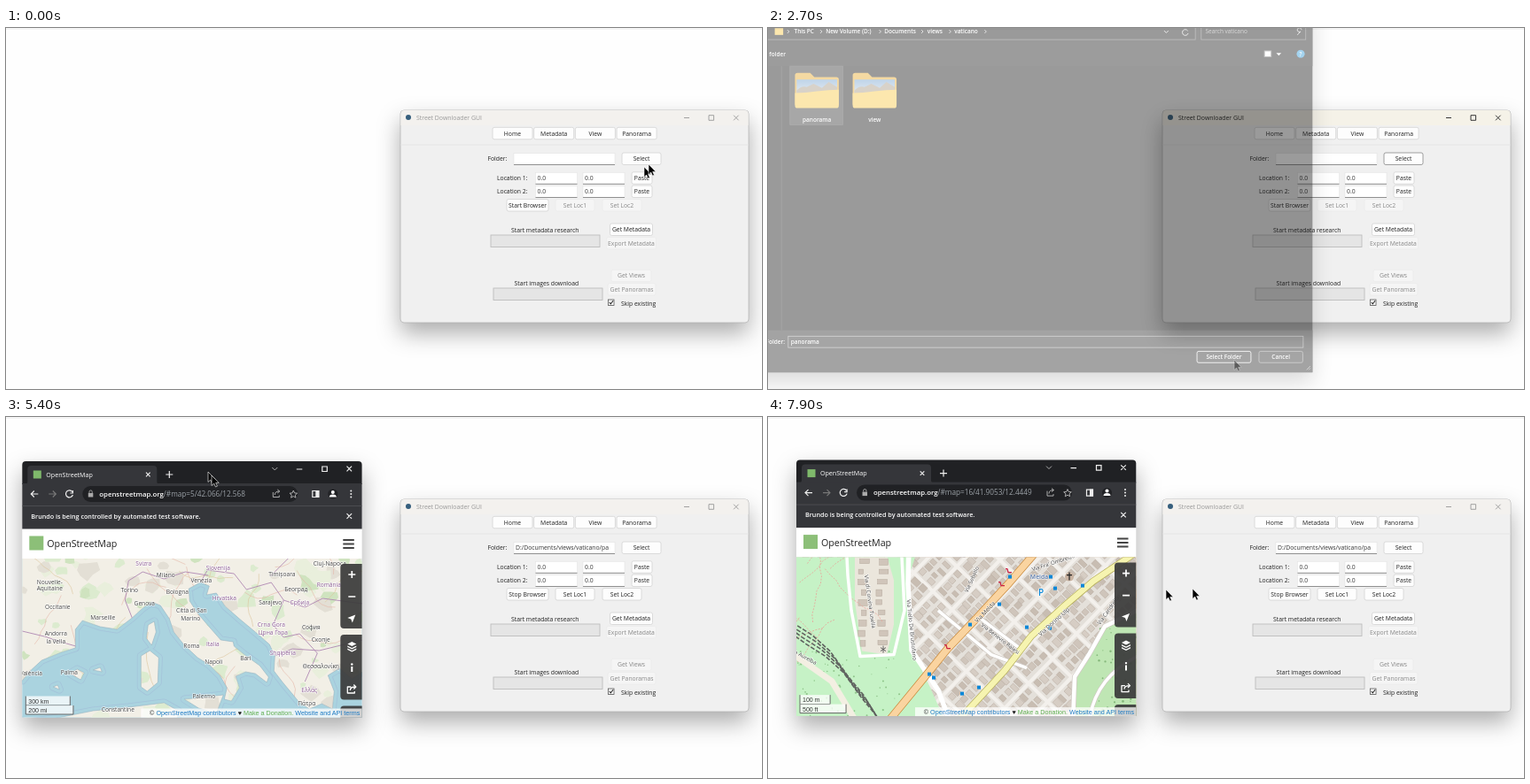
These frames come from a looping animation (853 by 408 pixels, 8 s). An HTML page:

```html
<!DOCTYPE html>
<html lang="en">
<head>
<meta charset="utf-8">
<title>Street Downloader</title>
<style>
html, body { margin: 0; width: 853px; height: 408px; overflow: hidden; background: #fefefe }
svg { display: block; font-family: "Open Sans", "Noto Sans", sans-serif }
text { white-space: pre }
.shadow { filter: drop-shadow(0 12px 13px rgba(0, 0, 0, .32)) }
.btn rect { fill: #fdfdfd; stroke: #d3d3d3; stroke-width: .8 }
.btn text { fill: #222; text-anchor: middle }
.btn.off rect { fill: #f5f5f5; stroke: #ebebeb }
.btn.off text { fill: #888 }
.btn.hot rect { fill: #c9e1f3; stroke: #2d78b4; stroke-width: 1.2 }
.btn.focus rect { stroke: #888 }
.halo text { paint-order: stroke; stroke: #fff; stroke-opacity: .7; stroke-width: 1.6; stroke-linejoin: round; text-anchor: middle }
.icon { fill: none; stroke: #eee; stroke-width: 1.2 }
</style>
</head>
<body>
<script>
const text = (x, y, s, size = 6.8, a = '') => `<text x="${x}" y="${y}" font-size="${size}" ${a}>${s}</text>`;
const rect = (x, y, w, h, fill, a = '') => `<rect x="${x}" y="${y}" width="${w}" height="${h}" fill="${fill}" ${a}/>`;
const path = (d, fill, a = '') => `<path d="${d}" fill="${fill}" ${a}/>`;
const line = (d, color, w = 1, a = '') => path(d, 'none', `stroke="${color}" stroke-width="${w}" stroke-linejoin="round" ${a}`);
const dot = (x, y, r, fill) => `<circle cx="${x}" cy="${y}" r="${r}" fill="${fill}"/>`;
const times = (n, f) => Array.from({ length: n }, (_, i) => f(i)).join('');

let seed = 7;
const rnd = (a = 0, b = 1) => {
  seed = (seed * 16807) % 2147483647;
  return a + (b - a) * seed / 2147483647;
};
const pick = list => list[Math.floor(rnd(0, list.length))];
const blob = (x, y, size, fill) => {
  let pts = [];
  for (let i = 0; i < 8; i++) {
    const r = size * rnd(.5, 1.1), a = i * Math.PI / 4;
    pts.push((x + r * Math.cos(a)).toFixed(1) + ' ' + (y + r * .8 * Math.sin(a)).toFixed(1));
  }
  return path('M' + pts.join('L') + 'Z', fill);
};
const wander = (x, y, a, n, step, bend) => {
  let d = `M${x.toFixed(1)} ${y.toFixed(1)}`;
  for (let i = 0; i < n; i++) {
    a += rnd(-bend, bend);
    x += step * Math.cos(a);
    y += step * Math.sin(a);
    d += `L${x.toFixed(1)} ${y.toFixed(1)}`;
  }
  return d;
};

// Downloader window
const btn = (x, y, w, s, cls = '', id = '') =>
  `<g class="btn ${cls}" id="${id}">${rect(x, y, w, 13.5, '', 'rx="2"')}${text(x + w / 2, y + 9.2, s)}</g>`;
const field = (x, y, w, s, id = '') =>
  rect(x, y, w, 13, '#fff', 'stroke="#e4e4e4" stroke-width=".6"') + line(`M${x} ${y + 13}h${w}`, '#858585', .9) +
  text(x + 2, y + 8.9, s, 6.8, `id="${id}" fill="#333"`);
const bar = (x, y) => rect(x, y, 123, 13.5, '#e5e5e5', 'stroke="#bdbdbd" stroke-width=".9"');
const gui = `
${rect(445, 93, 393, 240, '#f0f0f0', 'rx="4" class="shadow"')}
${rect(445, 93, 393, 240, '#f0f0f0', 'rx="4" stroke="#b5b5b5" stroke-width=".8"')}
${path('M445.5 110V97q0-4 4-4h384q4 0 4 4v13z', '#f3f1ee', 'id="titlebar"')}
${dot(454, 101, 3, '#365f7d')}
<g id="title">${text(463, 104, 'Street Downloader GUI', 6.9, 'fill="currentColor"')}
${line('M765 101.5h6M793 98.7h5.6v5.6h-5.6zM821 98.7l5.6 5.6m0-5.6l-5.6 5.6', 'currentColor', .9)}</g>
${['Home', 'Metadata', 'View', 'Panorama'].map((s, i) => btn(549 + i * 46.7, 112.3, 45, s)).join('')}
${line('M445 132h393', '#e2e2e2', .8)}
<g fill="#222">${text(543.5, 150.3, 'Folder:')}${field(573, 141.5, 114, '', 'folder')}${btn(695, 141, 44, 'Select', '', 'select')}
${[0, 1].map(i => text(554, 172.1 + i * 15.2, `Location ${i + 1}:`) + field(597.5, 163.3 + i * 15.2, 47, '0.0') +
    field(651, 163.3 + i * 15.2, 47, '0.0') + btn(706, 162.8 + i * 15.2, 23, 'Paste')).join('')}
${btn(565, 193.5, 47, 'Start Browser', '', 'start')}${btn(620, 193.5, 44, 'Set Loc1', 'off', 'loc1')}${btn(673, 193.5, 44, 'Set Loc2', 'off', 'loc2')}
${text(570, 231, 'Start metadata research')}${bar(547, 234)}
${btn(681.5, 221, 48, 'Get Metadata')}${btn(677.5, 236.4, 56, 'Export Metadata', 'off')}
${text(573.5, 291, 'Start images download')}${bar(550, 294)}
${btn(683, 273.2, 45, 'Get Views', 'off')}${btn(679, 288.6, 54, 'Get Panoramas', 'off')}
${rect(679.5, 307, 6.5, 6.5, '#fff', 'stroke="#555" stroke-width=".8"')}${line('M680.8 310l1.6 1.8 2.6-3.6', '#222', 1.1)}
${text(694, 313.5, 'Skip existing')}</g>`;

// Folder picker
const folder = (x, name) => `
${path(`M${x} 48q0-3 3-3h15l5 5h26q3 0 3 3v30H${x}z`, '#e9a92a')}
${rect(x + 2, 53, 48, 22, 'url(#photo)')}
${path(`M${x + 2} 66q6-6 12-4l8-4 10 5 8-7 10 6v8h-48z`, '#a79a86')}
${path(`M${x} 69q12 0 26-2 14-2 26-2v19q0 3-3 3h-46q-3 0-3-3z`, '#fbc947')}
${text(x + 26, 103.5, name, 6.8, 'fill="#fff" font-weight="600" text-anchor="middle"')}`;
const white = 'fill="#fff" font-weight="600"';
const crumbs = [[19, 'This PC'], [56.5, 'New Volume (D:)'], [126, 'Documents'], [177, 'views'], [209, 'vaticano']];
const picker = `
${rect(-60, -40, 694, 441, '#191919', 'class="shadow"')}
${rect(-60, -40, 694, 47, '#202020')}${rect(-60, 7, 694, 30, '#1c1c1c')}
${rect(-20, -14, 515, 19.5, '#191919', 'stroke="#777" stroke-width=".8"')}${rect(502, -14, 124, 19.5, '#191919', 'stroke="#777" stroke-width=".8"')}
${rect(-4, -8, 10, 8, '#fbc947')}
${crumbs.map(([x, s]) => text(x, -1.5, s, 6.8, white)).join('')}
${[11, 50, 120, 170, 203, 245].map(x => line(`M${x} -6l2 2-2 2`, '#ddd', .9)).join('')}
${line('M458 -5l2.5 2.5 2.5-2.5M486 -5a3.5 3.5 0 1 0 .5 3', '#ddd')}
${text(507, -1.5, 'Search vaticano', 6.8, 'fill="#aaa"')}${line('M621 -6a2.5 2.5 0 1 0-1 2l-4 4', '#ccc')}
${text(9, 25, 'New folder', 6.8, white + ' text-anchor="end"')}
${rect(577, 19, 8, 7, '#fff', 'stroke="#777" stroke-width="1"')}${path('M591 21.5h6l-3 3z', '#fff')}
${dot(620, 22.5, 4.8, '#2f9bdc')}${text(620, 25, '?', 6.8, white + ' text-anchor="middle"')}
${line('M4 37V351', '#3a3a3a', .8)}
<g id="tile">${rect(14, 37, 63, 70, '#666', 'stroke="#858585" stroke-width=".7"')}</g>
${folder(20, 'panorama')}${folder(88.5, 'view')}
${rect(-60, 351, 694, 50, '#2e2e2e')}
${text(8, 367.5, 'Folder:', 6.8, white + ' text-anchor="end"')}
${rect(12, 358, 611, 13.5, '#333', 'stroke="#aaa" stroke-width=".8"')}<g id="chosen">${text(15, 367.3, 'panorama', 6.8, white)}</g>
${[[497, 64, 'Select Folder', '#fff'], [570.5, 52, 'Cancel', '#999']].map(([x, w, s, c]) =>
    rect(x, 376, w, 13.5, '#333', `rx="2" stroke="${c}" stroke-width=".9"`) + text(x + w / 2, 385.3, s, 6.8, white + ' text-anchor="middle"')).join('')}
${line('M627 398l4.5-4.5m-2 4.5l2-2', '#aaa', .9)}`;

// Map of the region
const coast = 'M-200 145L0 138 10 126 22 115 44 106 60 101 60 80 68 70 88 77 107 80 124 67 136 56 146 49 156 53 166 68 171 83 183 98 198 112 211 120 223 132 231 146 228 159 236 161 245 146 241 133 252 128 263 130 276 140 278 134 268 121 250 108 239 99 238 94 224 92 210 76 198 62 189 48 188 34 201 27 211 31 208 41 219 39 229 54 245 68 263 83 279 97 285 110 284 127 294 140 304 152 313 163 324 170 338 164 350 170 352 150 345 132 358 124 372 136 384 128 600 130 600-150-200-150Z';
const islands = 'M142 75l7-4 2 12-5 15-6-8zM134 110l10-6 10 8-1 28-12 10-7-5zM183 159l20-2 24-3-8 21-20-6zM54 130l8-5 8 4-4 8zM80 126l8-3 2 5zM35 145l5-2 2 5zM-90 200L40 180 80 172 120 168 160 163 176 172 172 220z';
const towns = [[31, 29, 'Nouvelle-'], [31, 36, 'Aquitaine'], [40, 57, 'Occitanie'], [38, 87, 'Andorra'], [38, 96, 'la Vella'], [10, 132, 'València'],
  [53, 131, 'Palma'], [91, 69, 'Marseille'], [121, 38, 'Torino'], [137, 8, 'Svizra'], [162, 21, 'Milano'], [138, 53, 'Genova'], [175, 40, 'Bologna'],
  [202, 27, 'Venezia'], [221, 13, 'Slovenija'], [228, 47, 'Hrvatska'], [191, 61, 'Città di San'], [190, 70, 'Marino'], [191, 101, 'Roma'], [215, 99, 'Italia'],
  [216, 119, 'Napoli'], [252, 115, 'Bari'], [205, 158, 'Palermo'], [280, 52, 'Sarajevo'], [293, 20, 'Timișoara'], [309, 37, 'Београд'], [313, 52, 'Србија'],
  [281, 77, 'Crna Gora'], [283, 86, 'Црна Гора'], [294, 109, 'Shqipëria'], [326, 80, 'София'], [337, 94, 'Скопје'], [337, 124, 'Θεσσαλονίκη'],
  [324, 151, 'Ελλάς'], [321, 166, 'Πάτρα'], [108, 173, 'Constantine'], [347, 8, 'Cluj-Napoca'], [346, 32, 'România']];
const map5 = rect(-400, -300, 1200, 800, '#aad3df') +
  line(coast + islands, '#9fb4d6', 9, 'opacity=".55"') + line(coast + islands, '#aad3df', 7.5) +
  `<clipPath id="land">${path(coast + islands, '#000')}</clipPath>` + path(coast + islands, '#f2efe6') +
  `<g clip-path="url(#land)">` +
  times(150, () => blob(rnd(-10, 400), rnd(-10, 190), rnd(4, 15), pick(['#dcebcf', '#cfe3bf', '#e9efdc', '#e3dfd5']))) +
  times(30, () => line(wander(rnd(0, 384), rnd(0, 180), rnd(0, 6), 8, 8, .5), pick(['#e5b8a8', '#dcc59c']), .6)) +
  line('M0 82l25 6 25 8 14 4M124 67l-8-20 4-22 16-10 24 8 24-8 26 4M201 27l8-14 30 4 14 18 28-8 14 20-12 28 12 14 18-4 20 22-14 32M295 47l24 8 20-10 45 6M285 110l20-8 30 2 49-12M280 20l20-20', '#b08ab4', .9) + '</g>' +
  line(coast + islands, '#8aa9b8', .5) +
  '<g class="halo">' + towns.map(([x, y, s]) => text(x, y, s, 6.6, `fill="${/^(Sl|Hr|Ср|Ελ|It|Sh|Cr|Цр|Sv|Ro)/.test(s) && s !== 'Roma' ? '#8d5d96' : '#444'}"`)).join('') + '</g>';

// Map of the city
const spread = () => [rnd(-300, 760), rnd(-120, 320)];
const roads = (n, color, w, len) => times(n, () => line(wander(...spread(), rnd(0, 6.3), len, 9, .35), color, w));
const spokes = times(13, i => line(wander(230, 82, i * .483, 32, 12, .22), i % 3 ? '#f0ad62' : '#e8cf78', 1.8));
const ringRoad = 'M50-110L66-30 71 0 78 32 72 67 85 102 70 137 38 155 0 168-90 210';
const city = '<g class="halo" id="city">' + text(233, 68, 'Civitas Vaticana', 11, 'fill="#776d7c"') +
  text(237, 83, 'Città del', 11, 'fill="#776d7c"') + text(233, 98, 'Vaticano', 11, 'fill="#776d7c"') + '</g>';
const map12 = rect(-320, -140, 1100, 480, '#e9e6dd') +
  times(190, () => blob(...spread(), rnd(8, 28), pick(['#d2e8c3', '#bfe0ab', '#d9edca', '#b2d8a0']))) +
  times(150, () => blob(...spread(), rnd(7, 22), pick(['#dad6d2', '#e0dcd8', '#d2cecc']))) +
  roads(300, '#fbfaf7', 1, 9) + roads(60, '#eedd90', 1.3, 14) + roads(55, '#f0b070', 1.4, 14) + spokes +
  line(ringRoad, '#d8536f', 3.8) + line(ringRoad, '#ea8c9c', 1.4) +
  line('M384 20L330 40 350 80 384 110M-200 140L0 125 40 90 70 40 100-60', '#e58c7e', 1.8) +
  line('M160-80L185 20 203 65 200 140 298 180 400 260M203 65L290 90 384 70', '#8c8884', 1.8) +
  line('M160-80L185 20 203 65 200 140 298 180', '#ddd', .7, 'stroke-dasharray="4 4"') +
  line('M400-60L345 20 320 70 280 100 290 140 330 200', '#aad3df', 3) + dot(229, 80, 9, '#cfc4cf') + city +
  '<g class="halo">' +
  ['Riserva', 'Naturale', "dell'Acquafredda"].map((s, i) => text(117, 94 + i * 9, s, 7, 'fill="#5c9a50" font-style="italic"')).join('') +
  text(20, 34, 'n Monastero', 7.5, 'fill="#666"') + '</g>';

// Map of the quarter
const block = (x, y) => rect(x, y, 35, 26, '#e4e0da') +
  times(8, i => rect(x + 1 + i % 4 * 8.5 + rnd(0, 2), y + 1 + (i > 3) * 12.5 + rnd(0, 2), rnd(4.5, 7.5), rnd(6, 10), pick(['#cfc5bb', '#d6cdc4', '#c8bdb2']), 'stroke="#b5a99d" stroke-width=".5"'));
const stops = [[241, 22], [287, 22], [292, 35], [323, 32], [260, 79], [196, 76], [229, 53], [150, 132], [155, 136], [286, 80], [187, 154], [206, 147]];
const orangeRoad = 'M100 190L145 135 170 104 205 67 240 29 265 0 340-85';
const yellowRoad = 'M130 240L200 166 235 128 265 89 300 57 335 27 375 0 470-70';
const rails = 'M-80 20L0 78 22 92 42 110 62 138 80 160 95 185 130 240';
const road = (d, edge, fill, w) => line(d, edge, w) + line(d, fill, w - 1.4);
const label = (x, y, a, s, size = 6.2) => `<g transform="translate(${x} ${y}) rotate(${a})">${text(0, 2, s, size, 'fill="#444"')}</g>`;
const map16 = rect(-250, -140, 900, 460, '#f3f0ec') +
  '<g transform="translate(200 80) rotate(-46)">' + times(260, i => block((i % 13 - 7) * 39, (Math.floor(i / 13) - 10) * 30)) + '</g>' +
  path('M-260-140H110L134 0 124 30 128 100 150 145 170 190 120 330H-260z', '#c6f2c6') +
  path('M310 330L314 140 330 115 345 85 362 70 400 52 660 10V330z', '#bfe6b4') +
  path('M66-20l30-4 14 50 0 50-8 34-28-4-8-56z', '#ebe6dc') +
  times(18, i => rect(70 + i % 2 * 20 + rnd(-1, 4), 2 + Math.floor(i / 2) * 11.5, rnd(5, 11), rnd(5, 8), '#d0c5ba', 'stroke="#b5a99d" stroke-width=".5"')) +
  times(70, () => dot(rnd(-20, 120), rnd(105, 185), rnd(.5, 1.2), '#8fc58a')) +
  times(60, () => dot(rnd(335, 400), rnd(80, 180), rnd(.5, 1.5), '#86b97c')) +
  times(10, () => line(wander(rnd(-20, 50), rnd(0, 100), rnd(0, 6), 10, 9, .4), '#e9a399', .8, 'stroke-dasharray="2 1.5"')) +
  line('M55-40L58 20 62 60 72 112 110 110 122 60 118-20', '#fff', 3.5) + line('M-40 110L0 112 40 140 70 190', '#f3efe2', 7) +
  line('M128-60L126 30 130 105 160 150 190 230', '#fff', 5.5) +
  times(4, i => `<g transform="translate(${i * 5 - 4} ${i * 8 - 4})">${line(rails, '#5f625f', 1.6, 'stroke-dasharray="5 2"')}</g>`) +
  road('M310 240L314 135 330 110 348 78 420 42', '#cfc9c2', '#fff', 6) + road('M330 190Q335 130 400 105', '#cfc9c2', '#fff', 5) +
  road('M160 60L220 110 260 125M205 67L255 105', '#cfc9c2', '#fff', 5) +
  road(orangeRoad, '#c98a3c', '#fad4a0', 9) + road(yellowRoad, '#b6ae5a', '#f6f4b0', 8) +
  stops.map(([x, y]) => rect(x - 2, y - 2, 4, 4, '#0a87d8')).join('') +
  dot(308, 22, 5, '#c9b3a1') + line('M308 17v9m-3-6h6', '#222', 1.2) + line('M95 102l6 4m-6 0l6-4m-3-2v8', '#555', .9) +
  [[231, 31], [239, 16], [170, 102]].map(([x, y]) => line(`M${x - 3} ${y - 3}h2l1 4h4`, '#c24', 1.3)).join('') +
  '<g class="halo">' + label(213, 62, -46, 'Via Melda', 6.6) + label(291, 73, -42, 'Via Dorino Ulp', 6.6) +
  label(83, 50, 82, 'Via di Corvina Tusella') + label(130, 82, 84, 'Via Tiello De Brustofano') + label(230, 92, 38, 'Via Benevro Ralesi') +
  label(198, 25, -66, 'Via Sebello') + label(290, 6, -18, "Via Fra' Ombrelzo") + label(8, 112, 28, 'Via Aurelba') + label(352, 60, -55, 'Via Candrelia') +
  text(274, 24, 'Melda', 6.8, 'fill="#57a" font-weight="600"') + text(276, 43, 'P', 10, 'fill="#0a87d8" font-weight="600"') + '</g>';

// Browser window
const cross = (x, y, r = 2.8) => `M${x - r} ${y - r}l${2 * r} ${2 * r}m0-${2 * r}l-${2 * r} ${2 * r}`;
const pane = (y, h) => path(`M383.3 ${y}h-20.3q-4 0-4 4v${h - 8}q0 4 4 4h20.3z`, '#3c3c3c', 'opacity=".93"');
const browser = `
${rect(0, 0, 383.3, 289.5, '#fff', 'rx="3" class="shadow"')}
<g id="page">
${path('M0 26V4q0-4 4-4h375.3q4 0 4 4v22z', '#202124')}
${path('M3 26q3 0 3-3V9q0-4 4-4h138q4 0 4 4v14q0 3 3 3z', '#35363a')}${rect(0, 25, 383.3, 51.5, '#35363a')}
${rect(12.5, 10.5, 9, 9, '#7fb96b')}${text(27, 17.6, 'OpenStreetMap', 7.1, 'fill="#fff"')}
${rect(68, 28, 243, 18, '#202124', 'rx="9"')}
<path class="icon" d="${cross(142, 15, 2.3)}M162 15h8m-4-4v8M309.5 9h6.5M338.5 6h5.5v5.5h-5.5z${cross(369, 8.5)}
M18 37h-8m3.5-3.5l-3.5 3.5 3.5 3.5M56.5 34.5a4 4 0 1 0 .6 3.5m0-5v3h-3M327.5 33.5h7v7h-7z${cross(369, 62)}"/>
${line('M30 37h8m-3.5-3.5l3.5 3.5-3.5 3.5', '#777', 1.2)}
${line('M282 7l3 3 3-3M283 35v5.5h7v-2M285 38q0-4 5-4m-2-2l2.5 2-2.5 2M306 33l1.3 2.9 3 .3-2.3 2 .7 3-2.7-1.6-2.7 1.6 .7-3-2.3-2 3-.3z', '#bbb', .9)}
${rect(331, 33, 4, 8, '#eee')}${dot(350.5, 37, 5.5, '#202124')}${dot(350.5, 35, 2, '#fff')}${path('M346.5 40.5q0-3 4-3t4 3z', '#fff')}
${[33.5, 37, 40.5].map(y => dot(371, y, 1, '#eee')).join('')}
${rect(74.5, 36, 5.5, 4.5, '#aaa')}${line('M75.7 36v-1.5a1.6 1.6 0 0 1 3.2 0V36', '#aaa', .9)}
${text(87, 39.7, '<tspan fill="#fff" font-weight="600" font-size="7.8">openstreetmap.org</tspan><tspan id="url" fill="#9aa0a6"></tspan>', 8.2)}
${line('M0 50.5h383.3', '#515256', .8)}${text(10, 64.8, 'Brundo is being controlled by automated test software.', 7.2, white)}
${rect(8, 84.5, 16, 16, '#8cbf78')}${text(28, 97, 'OpenStreetMap', 10.7, 'fill="#222"')}
${line('M362 89h12.5M362 93.5h12.5M362 98h12.5', '#444', 2)}
<svg x="0" y="110" width="383.3" height="179.5">
<g id="m5">${map5}</g><g id="m12">${map12}</g><g id="ghost"><use href="#city" opacity=".45" transform="translate(-174.8 -62.3) scale(1.76)"/></g><g id="m16">${map16}</g>
</svg>
${pane(116, 73)}${pane(196, 73.5)}${path('M383.3 276.5h-20.3q-4 0-4 4v9h24.3z', '#3c3c3c', 'opacity=".93"')}
${line('M368 128h8m-4-4v8M368 153h8', '#fff', 1.7)}${path('M376 173.5l-3.5 9-1.5-4-4-1.5z', '#fff')}
${path('M372 204l5 2.5-5 2.5-5-2.5zM367 208.5l5 2.5 5-2.5v1.5l-5 2.5-5-2.5zM367 211.5l5 2.5 5-2.5v1.5l-5 2.5-5-2.5z', '#fff')}
${dot(372, 229.5, 1.2, '#fff')}${line('M372 232v6', '#fff', 2)}
${line('M371 255h-4v7h8v-2M370 259q0-4 6-4m-2-2.5l2.5 2.5-2.5 2.5', '#fff', 1.3)}
${rect(134, 279.5, 249.3, 10, '#fff', 'opacity=".75"')}
${text(381, 287.2, '<tspan fill="#333">© </tspan>OpenStreetMap contributors <tspan fill="#222">♥</tspan> <tspan fill="#5fae50">Make a Donation.</tspan> Website and API terms', 7.2, 'fill="#1a78c2" text-anchor="end" font-family="Liberation Sans, Arial, sans-serif"')}
${[0, 1].map(i => `<rect id="box${i}" x="4" y="${265.5 + i * 10.5}" height="10" fill="#fff" fill-opacity=".75"/><path id="rule${i}" fill="none" stroke="#666"/>` +
    text(7, 273.5 + i * 10.5, '', 7, `id="scale${i}" fill="#333" font-family="Liberation Sans, Arial, sans-serif"`)).join('')}
</g>`;

const arrow = 'M0 0V11.5L2.7 9.1 4.5 13 6.4 12.2 4.7 8.4H8.2Z';
document.body.innerHTML = `<svg width="853" height="408" viewBox="0 0 853 408">
<defs><linearGradient id="photo" x2="0" y2="1"><stop stop-color="#6f9fd0"/><stop offset="1" stop-color="#d5dde2"/></linearGradient></defs>
${line('M0 1h853', '#ececec', 1)}<g id="gui">${gui}</g><g id="browser">${browser}</g><g id="picker">${picker}</g>
<path id="trail" d="${arrow}" stroke="#fff" stroke-width=".6"/><path id="cursor" d="${arrow}" stroke="#fff" stroke-width=".6"/>
<path id="hand" d="M2 0q1.2 0 1.2 1.2V5l5 1q1 .3.9 1.5L8.5 11 7.5 13H3L-1.5 8q.5-1.5 2.3 0V1.2Q.8 0 2 0z" fill="#fff" stroke="#222" stroke-width=".8"/></svg>`;

// Motion
const $ = id => document.getElementById(id);
const set = (id, name, value) => $(id).setAttribute(name, value);
const show = (id, on) => set(id, 'opacity', +on);
const clamp = v => Math.max(0, Math.min(1, v));
const at = (keys, t) => {
  const i = keys.findIndex(k => k[0] >= t);
  if (i < 0) return keys[keys.length - 1].slice(1);
  if (!i) return keys[0].slice(1);
  const a = keys[i - 1], b = keys[i], f = (t - a[0]) / (b[0] - a[0]);
  return a.slice(1).map((v, j) => v + (b[j + 1] - v) * f);
};
const pointer = [[-100, 720, 157], [0, 725, 154], [200, 716, 149], [600, 716, 149], [1100, 60, 70], [1400, 60, 70], [1500, 97, 82], [1600, 183, 127],
  [2200, 526, 375], [2800, 526, 375], [3500, 586, 205], [4200, 586, 205], [4700, 62, -154], [5300, 228, 62], [5400, 232, 66], [5600, 246, 64],
  [5800, 230, 224], [7400, 230, 224], [7800, 449, 195], [7900, 479, 194]];
const windowPos = [[4700, -152, -170], [5300, 16, 48], [5400, 18.3, 50], [5600, 32, 48.6]];
const pickerFade = [[500, 0], [600, .4], [700, .8], [800, 1], [2600, 1], [2700, .43], [2800, 0]];
const zoomLevel = [[5900, 5], [7100, 12], [7500, 16]];
const scales = ['300 km,200 mi', '200 km,100 mi', '100 km,50 mi', '50 km,30 mi', '20 km,10 mi', '10 km,5 mi',
  '5 km,3 mi', '2 km,1 mi', '1 km,3000 ft', '500 m,2000 ft', '300 m,1000 ft', '100 m,500 ft'];
const metres = { km: 1000, m: 1, mi: 1609, ft: .305 };
const zoomAbout = (id, x, y, k) => set(id, 'transform', `translate(${x} ${y}) scale(${k}) translate(${-x} ${-y})`);

function drawMap(t) {
  const [z] = at(zoomLevel, t), level = Math.floor(z);
  zoomAbout('m5', 195, 93, 2 ** Math.min(z - 5, 4));
  zoomAbout('m12', 230, 82, Math.max(.45, 2 ** (z - 12)));
  zoomAbout('m16', 192, 95, Math.max(.5, 2 ** (z - 16)));
  set('m12', 'opacity', clamp(z - 7.5));
  set('m16', 'opacity', clamp(z - 13.5));
  show('ghost', z >= 12 && z < 13);
  const f = clamp((z - 5) / 7), g = clamp((z - 12) / 4), digits = level < 9 ? 3 : 4;
  $('url').textContent = `/#map=${level}/${(42.066 - .1676 * f + .0069 * g).toFixed(digits)}/${(12.568 - .1346 * f + .0115 * g).toFixed(digits)}`;
  scales[level - 5].split(',').forEach((s, i) => {
    const [n, unit] = s.split(' '), w = n * metres[unit] / 6000 * 2 ** (level - 5);
    set('box' + i, 'width', w);
    set('rule' + i, 'd', i ? `M4 276v10h${w}v-10` : `M4 265.5v10.5h${w}v-10.5`);
    $('scale' + i).textContent = s;
  });
}

function draw(t) {
  const active = t >= 200 && t < 500 || t >= 2600 && t < 4300, running = t >= 4400;
  set('title', 'color', active ? '#222' : '#999');
  set('titlebar', 'fill', active ? '#f5f2e8' : '#f3f1ee');
  $('folder').textContent = t >= 2900 ? 'D:/Documents/views/vaticano/pa' : '';
  set('select', 'class', t >= 300 && t < 500 ? 'btn hot' : t >= 2600 && t < 3300 ? 'btn focus' : 'btn');
  set('start', 'class', t >= 3500 && t < 4300 ? 'btn hot' : 'btn');
  $('start').lastChild.textContent = running ? 'Stop Browser' : 'Start Browser';
  for (const id of ['loc1', 'loc2']) set(id, 'class', running ? 'btn' : 'btn off');

  const [fade] = at(pickerFade, t), closing = t >= 2600 && fade > 0;
  set('picker', 'opacity', fade);
  zoomAbout('picker', 233, 160, 1 - .086 * (1 - fade));
  set('tile', 'opacity', t < 1200 ? 0 : closing ? .4 : 1);
  show('chosen', t >= 1200);

  show('browser', t >= 4000);
  show('page', t >= 4300);
  set('browser', 'transform', `translate(${at(windowPos, t)})`);
  drawMap(t);

  const now = at(pointer, t), before = at(pointer, t - 100), overMap = t >= 5800 && t <= 7400;
  for (const id of ['cursor', 'hand']) set(id, 'transform', `translate(${now})`);
  set('trail', 'transform', `translate(${before})`);
  set('trail', 'fill', fade === 1 ? '#fff' : '#000');
  set('cursor', 'opacity', overMap ? 0 : closing ? fade : 1);
  show('hand', overMap);
  show('trail', !overMap && now + '' !== before + '');
}

let last = -1;
function tick() {
  const t = Math.floor(performance.now() % 8000 / 100) * 100;
  if (t !== last) draw(last = t);
  requestAnimationFrame(tick);
}
tick();
</script>
</body>
</html>
```
